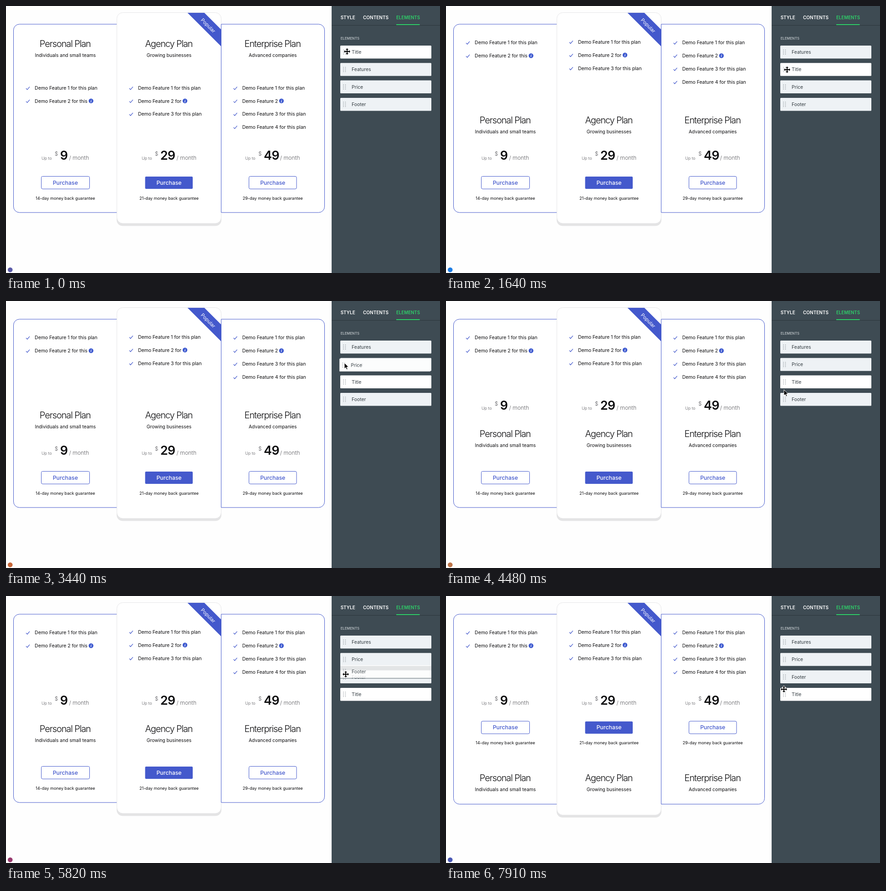
An HTML page that plays this animation: 953 by 587 pixels, repeating every 8000 ms.

```html
<!DOCTYPE html>
<html lang="en">
<head>
<meta charset="utf-8">
<title>Pricing table editor</title>
<style>
html, body { margin: 0; width: 100%; height: 100%; overflow: hidden; background: #fefefe; }
svg { display: block; width: 953px; height: 587px; font-family: Inter, "Liberation Sans", sans-serif; }
text { white-space: pre; }
</style>
</head>
<body>
<svg id="stage" viewBox="0 0 953 587"></svg>
<script>
const BLUE = '#4459cc', INK = '#0c0c0e', STEP = 149, LOOP = 8000;
const stage = document.getElementById('stage');

function add(parent, tag, attrs, content) {
  const el = document.createElementNS('http://www.w3.org/2000/svg', tag);
  for (const key in attrs) el.setAttribute(key, attrs[key]);
  if (content) el.textContent = content;
  return parent.appendChild(el);
}
const group = (parent = stage) => add(parent, 'g', {});
const rect = (parent, x, y, width, height, fill, more) =>
  add(parent, 'rect', { x, y, width, height, fill, ...more });
const text = (parent, x, y, size, str, more) =>
  add(parent, 'text', { x, y, 'font-size': size, fill: INK, ...more }, str);
const move = (el, x, y) => el.setAttribute('transform', `translate(${x} ${y})`);

// Cards
const outer = rect(stage, 16.5, 40, 683, 414, '#fff', { rx: 13, stroke: BLUE });
const lip = rect(stage, 243, 20, 230, 463.5, '#e4e4e5', { rx: 13 });
const inner = rect(stage, 243.5, 14.5, 229, 463.5, '#fff', { rx: 13, stroke: '#e6e6e8' });
const edge = rect(stage, 472, 40, 1, 414, BLUE);
add(stage, 'path', { d: 'M398.6 15h37l37 37v37z', fill: BLUE });
text(stage, 0, 4, 11, 'Popular', {
  fill: '#fff', 'text-anchor': 'middle', transform: 'translate(444 43) rotate(45)' });

// Plans
const mid = { 'text-anchor': 'middle' };
const plans = [
  { x: 130.3, left: 48, price: '9', up: 78, name: 'Personal', sub: 'Individuals and small teams',
    days: 14, count: 2, tip: ['for this', 186.7] },
  { x: 358, left: 274.8, price: '29', up: 298, name: 'Agency', sub: 'Growing businesses',
    days: 21, count: 3, tip: ['for', 393] },
  { x: 585.7, left: 503.6, price: '49', up: 525.2, name: 'Enterprise', sub: 'Advanced companies',
    days: 29, count: 4, tip: ['', 604.8] }
].map((p, col) => {
  const title = group(), price = group(), footer = group();
  text(title, p.x - .5, 90, 20, p.name + ' Plan', { ...mid, 'font-weight': 350, 'letter-spacing': '-.056em' });
  text(title, p.x, 112, 10.3, p.sub, mid);

  const features = Array.from({ length: p.count }, (_, i) => {
    const row = group();
    add(row, 'path', { d: `M${p.left - 4} .7l2.7 2.8 5.2-6.2`, fill: 'none', stroke: BLUE, 'stroke-width': 1.2 });
    text(row, p.left + 15.1, 3.7, 10.45, `Demo Feature ${i + 1} ` + (i == 1 ? p.tip[0] : 'for this plan'));
    if (i == 1) {
      add(row, 'circle', { cx: p.tip[1], cy: -.3, r: 5.2, fill: '#3f5bd0' });
      text(row, p.tip[1], 2.8, 9, 'i', { ...mid, fill: '#fff', 'font-family': 'Liberation Serif, serif',
        'font-style': 'italic', 'font-weight': 700 });
    }
    return row;
  });

  const grey = { fill: '#5c5c60', 'font-weight': 350 };
  text(price, p.up, 338, 9, 'Up to', grey);
  text(price, p.up + 29, 329, 11.5, '$', grey);
  text(price, p.up + 40.8, 338, 27, p.price, { 'font-weight': 600, 'letter-spacing': '-.03em' });
  text(price, p.up + (col ? 76.6 : 60.6), 338, 12.2, '/ month', grey);

  const solid = col == 1;
  if (solid) rect(footer, 305.5, 375, 104.5, 27, BLUE, { rx: 2 });
  else rect(footer, col ? 533.5 : 77.5, 374.5, col ? 104.5 : 106, 27.7, '#fff', { rx: 3, stroke: BLUE });
  text(footer, p.x, 392.6, 12.3, 'Purchase', { ...mid, fill: solid ? '#fff' : BLUE, 'font-weight': 500 });
  text(footer, p.x, 425.7, 9.1, p.days + '-day money back guarantee', mid);
  return { title, price, footer, features };
});

// Sidebar
rect(stage, 715, 0, 238, 587, '#3e4b53');
rect(stage, 715, 42, 238, 1, '#2c373d');
[['STYLE', 734.7], ['CONTENTS', 784], ['ELEMENTS', 857]].forEach(([name, x], i) =>
  text(stage, x, 28.8, i == 2 ? 9.7 : 10, name, { fill: i == 2 ? '#2fd06a' : '#fff', 'font-weight': 600 }));
rect(stage, 857, 40, 51.5, 2, '#2fd06a');
text(stage, 734.7, 74.2, 7.7, 'ELEMENTS', { fill: '#b4bbbf', 'font-weight': 600 });

function makeItem(name) {
  const g = group();
  const box = rect(g, 734, 0, 200, 28.5, '#eef2f5', { rx: 1.5 });
  for (let i = 0; i < 8; i++)
    rect(g, 740.5 + i % 2 * 4.3, 8.8 + (i >> 1) * 3.2, 1.3, 1.3, '#7d868b');
  text(g, 759, 18, 10.4, name, { fill: '#323b40' });
  return { g, box };
}
const names = ['Title', 'Features', 'Price', 'Footer'];
const items = Object.fromEntries(names.map(n => [n, makeItem(n)]));
const ghosts = Object.fromEntries(names.map(n => {
  const { g, box } = makeItem(n);
  box.setAttribute('fill', '#fff');
  rect(g, 734, 28.5, 200, 1, '#3e4b53');
  g.setAttribute('opacity', .86);
  return [n, g];
}));

// Pointers and the coloured dot
const cross = add(stage, 'path', {
  d: 'M0-7l3 3H1v3h3v-2l3 3-3 3V1H1v3h2l-3 3-3-3h2V1h-3v2l-3-3 3-3v2h3v-3h-2z',
  fill: '#000', stroke: '#fff', 'stroke-width': 1.6, 'paint-order': 'stroke' });
const arrow = add(stage, 'path', {
  d: 'M0 0v13l3-2.8 2 4.6 2.2-.9-2-4.6h4z', fill: '#000', stroke: '#fff', 'stroke-width': 1 });
const dot = add(stage, 'circle', { cx: 9.2, cy: 580, r: 5.3 });

// Timeline: [time, ...values]
const path = [
  [0, 749, 100], [300, 749, 100], [1190, 752, 141], [1480, 749, 140], [2240, 749, 140],
  [2530, 745, 173], [2840, 745, 173], [3420, 743, 136], [3740, 743, 136], [3890, 743, 140],
  [4470, 742, 195], [4910, 746, 222], [5060, 746, 222], [5810, 746, 172], [6100, 746, 171],
  [6400, 742, 184], [7300, 742, 184], [7890, 742, 205]];
const tints = [
  [0, 91, 91, 168], [1640, 30, 125, 228], [3430, 200, 104, 58], [4470, 190, 118, 74],
  [5810, 152, 58, 110], [7000, 16, 128, 240], [7890, 74, 88, 180]];
const drags = [[300, 1340, 'Title'], [2840, 3720, 'Price'], [5060, 6100, 'Footer']];
const orders = [
  [0, 'Title', 'Features', 'Price', 'Footer'], [740, 'Features', 'Title', 'Price', 'Footer'],
  [3120, 'Features', 'Price', 'Title', 'Footer'], [5500, 'Features', 'Price', 'Footer', 'Title']];
// Vertical shifts of title, features, price, footer, card bottom
const layouts = [[0, 0, 0, 0, 0, 0], [1480, 168, 1, 0, 0, 0],
  [3860, 209, 1, -99, 0, 0], [6240, 317, 1, -99, -99.3, 3.6]];

const current = (keys, t) => keys.filter(k => k[0] <= t).pop().slice(1);
function tween(keys, t) {
  const i = keys.findIndex(k => k[0] > t);
  if (i < 0) return keys[keys.length - 1].slice(1);
  const [a, b] = [keys[i - 1], keys[i]], f = (t - a[0]) / (b[0] - a[0]);
  return a.slice(1).map((v, j) => v + (b[j + 1] - v) * f);
}

function draw(t) {
  const [x, y] = tween(path, t);
  const drag = drags.find(d => t >= d[0] && t < d[1]);
  const start = drag && tween(path, drag[0]);
  const slotTop = i => 87 + 38.3 * i;
  const slotAt = py => Math.floor((py - 87) / 38.3);

  // The highlight stays on the slot where a drag began
  const hover = slotAt(drag ? start[1] : y);
  current(orders, t).forEach((name, i) => {
    move(items[name].g, 0, slotTop(i));
    items[name].box.setAttribute('fill', i == hover ? '#fff' : '#eef2f5');
  });
  for (const name of names) {
    const on = drag && drag[2] == name;
    ghosts[name].setAttribute('visibility', on ? 'visible' : 'hidden');
    if (on) move(ghosts[name], x - start[0], slotTop(hover) + y - start[1]);
  }

  const [title, raised, price, footer, grow] = current(layouts, t);
  plans.forEach((p, col) => {
    move(p.title, 0, title);
    move(p.price, 0, price);
    move(p.footer, 0, footer);
    p.features.forEach((row, i) =>
      move(row, 0, raised ? (col == 1 ? 79 : 80.5) + 29 * i : 180.3 + 28.6 * i));
  });
  outer.setAttribute('height', 414 + grow);
  edge.setAttribute('height', 414 + grow);
  inner.setAttribute('height', 463.5 + grow);
  lip.setAttribute('height', 463.5 + grow);

  const useArrow = t > 2900 && t < 4700;
  arrow.setAttribute('visibility', useArrow ? 'visible' : 'hidden');
  cross.setAttribute('visibility', useArrow ? 'hidden' : 'visible');
  move(useArrow ? arrow : cross, x, y);
  dot.setAttribute('fill', `rgb(${tween(tints, t).map(Math.round)})`);
}

function tick() {
  draw(Math.floor(performance.now() % LOOP / STEP) * STEP);
  requestAnimationFrame(tick);
}
tick();
</script>
</body>
</html>
```
